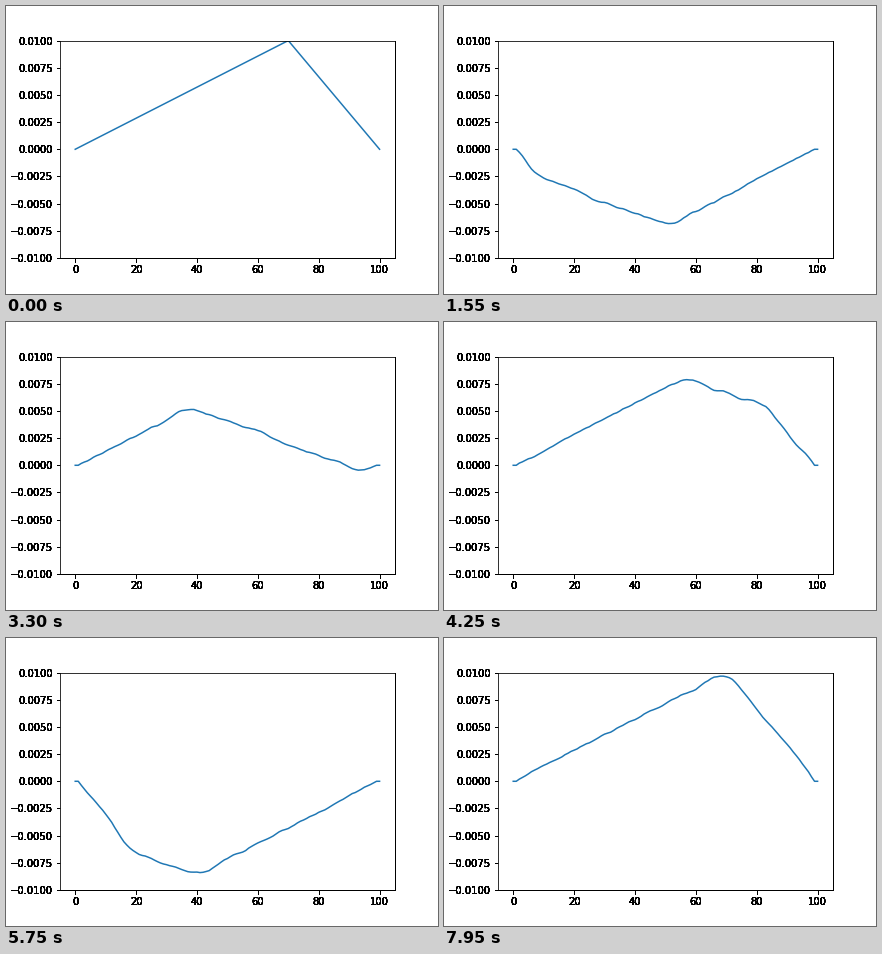
These frames come from a looping animation (432 by 288 pixels, 8000 ms). A matplotlib script:

```python
import numpy as np
import matplotlib.pyplot as plt
from matplotlib.animation import FuncAnimation

FRAMES, INTERVAL = 160, 50
STEPS = 10          # time steps per frame
COURANT = 0.247     # wave speed * dt / dx
PEAK, HEIGHT = 70, 0.01
INK = 12            # how often the outer labels are overprinted

nodes = np.arange(101)


def pluck():
    return np.interp(nodes, [0, PEAK, 100], [0, HEIGHT, 0])


def vibrate():
    """Leapfrog solution of the wave equation, one row per frame."""
    prev, now = pluck(), pluck()
    rows = [now.copy()]
    for _ in range(FRAMES - 1):
        for _ in range(STEPS):
            new = np.zeros_like(now)
            bend = now[3:-1] - 2 * now[2:-2] + now[1:-3]
            new[2:-2] = 2 * now[2:-2] - prev[2:-2] + COURANT**2 * bend
            # the two outermost nodes on each side are clamped at zero
            now[[0, 1, -2, -1]] = 0
            prev, now = now, new
        rows.append(now.copy())
    return rows


plt.rcParams.update({"font.family": "DejaVu Sans", "font.size": 10})
fig, ax = plt.subplots(figsize=(6, 4), dpi=72, facecolor="white")
fig.subplots_adjust(left=0.125, right=0.9, bottom=0.125, top=0.88)
ax.set(xlim=(-5, 105), ylim=(-0.01, 0.01))

# overprint labels and ticks so that their soft edges turn dark
fig.canvas.draw()
shot = np.asarray(fig.canvas.buffer_rgba())[..., :3] / 255
fig.figimage(shot**INK, origin="upper", zorder=-1)

shapes = vibrate()
string, = ax.plot(nodes, shapes[0], color="#1f77b4", lw=1.5)
ax.set(xlim=(-5, 105), ylim=(-0.01, 0.01))


def update(frame):
    string.set_ydata(shapes[frame])
    return string,


anim = FuncAnimation(fig, update, frames=FRAMES, interval=INTERVAL,
                     repeat=True, repeat_delay=0)
plt.show()
```
